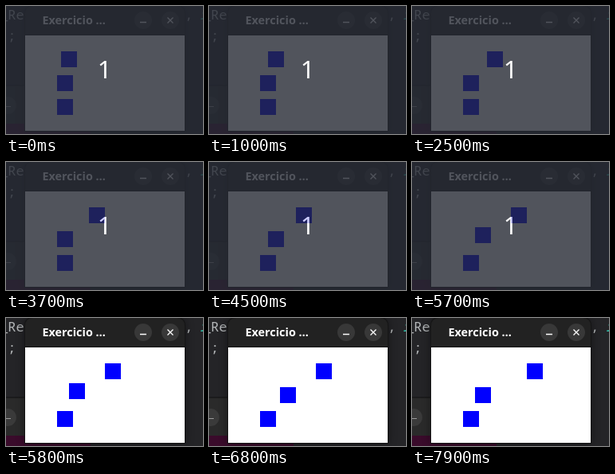
Animation of 247x161 px, one loop 8000 ms. Source, as an HTML page:

```html
<!DOCTYPE html>
<html lang="pt">
<head>
<meta charset="utf-8">
<title>Exercicio</title>
<style>
  html, body { margin: 0; width: 100%; height: 100%; overflow: hidden; background: #202022; }
  svg { display: block; width: 100vw; height: 100vh; }
  .code { font: 17px "Noto Sans Mono", monospace; fill: #b2b5b7; }
  .title { font: bold 14.4px "Noto Sans", "Open Sans", sans-serif; fill: #fff; }
  .count { font: 31px "Noto Sans", "Open Sans", sans-serif; fill: #fff; text-anchor: middle; }
</style>
</head>
<body>
<svg viewBox="0 0 247 161">
  <defs>
    <filter id="soft" x="-20%" y="-20%" width="140%" height="140%">
      <feGaussianBlur stdDeviation="6"/>
    </filter>
  </defs>

  <!-- desktop behind the window -->
  <rect width="247" height="161" fill="#242427"/>
  <text class="code" x="-8" y="17">_Re</text>
  <text class="code" x="2" y="43">;</text>
  <text class="code" x="224" y="17">,</text>
  <text class="code" x="243" y="17" style="fill:#2fb5a0;font-weight:bold;font-style:italic">i</text>
  <rect y="100" width="106" height="61" fill="#2a2a2a"/>
  <rect y="99.5" width="106" height="1" fill="#101010"/>
  <circle cx="2" cy="125" r="11" fill="#3a3a3a"/>
  <path d="M0 126.5H6" stroke="#9a9a9a"/>
  <rect y="148" width="106" height="13" fill="#3a0b2b"/>

  <!-- window -->
  <rect x="24" y="2" width="200" height="156" fill="#000" opacity=".5" filter="url(#soft)"/>
  <path d="M23 158V10Q23 -1 34 -1H214Q225 -1 225 10V158Z" fill="#151515"/>
  <path d="M24 37V10Q24 0 34 0H214Q224 0 224 10V37Z" fill="#222"/>
  <rect x="24" y="36" width="200" height="1" fill="#141414"/>
  <text class="title" x="45.5" y="23">Exercicio …</text>
  <g fill="#383838">
    <circle cx="172" cy="18" r="11"/>
    <circle cx="206" cy="18" r="11"/>
  </g>
  <path d="M168 20.5H176M202.5 14.5L209.5 21.5M209.5 14.5L202.5 21.5" stroke="#fff" stroke-width="1.3"/>
  <rect x="24" y="37" width="200" height="120" fill="#fff"/>
  <g fill="#00f" shape-rendering="crispEdges">
    <rect id="runner" y="57" width="20" height="20"/>
    <rect id="player" width="20" height="20"/>
    <rect x="64" y="117" width="20" height="20"/>
  </g>

  <!-- countdown veil: the digit shares its opacity -->
  <g id="veil" opacity=".8">
    <rect width="247" height="161" fill="#262a34"/>
    <text class="count" x="123.5" y="91">1</text>
  </g>
</svg>
<script>
  const LOOP = 8000, STEP = 5, VEIL_END = 5800;
  const ROUTE = "RRRURLDRRLL";
  const MOVES = { R: [1, 0], L: [-1, 0], U: [0, -1], D: [0, 1] };
  const runner = document.getElementById("runner");
  const player = document.getElementById("player");
  const veil = document.getElementById("veil");

  // the top square's beat, about half a second with a slight swing
  const beat = k => 480 + 519 * k + 120 * Math.cos((k - 2) * Math.PI / 3);

  // key presses for the middle square, slowing down
  const press = k => 4250 + 220 * k + 12 * k * k;

  // how many events of a rising schedule have passed
  function passed(schedule, t) {
    let n = 0;
    while (schedule(n) <= t) n++;
    return n;
  }

  function place(el, x, y) {
    el.setAttribute("x", x);
    el.setAttribute("y", y);
  }

  function draw(t) {
    place(runner, 69 + STEP * passed(beat, t), 57);
    let x = 64, y = 87;
    for (const key of ROUTE.slice(0, passed(press, t))) {
      const [dx, dy] = MOVES[key];
      x += dx * STEP;
      y += dy * STEP;
    }
    place(player, x, y);
    veil.style.display = t < VEIL_END ? "" : "none";
  }

  const start = performance.now();
  function frame() {
    draw((performance.now() - start) % LOOP);
    requestAnimationFrame(frame);
  }
  draw(0);
  requestAnimationFrame(frame);
</script>
</body>
</html>
```
